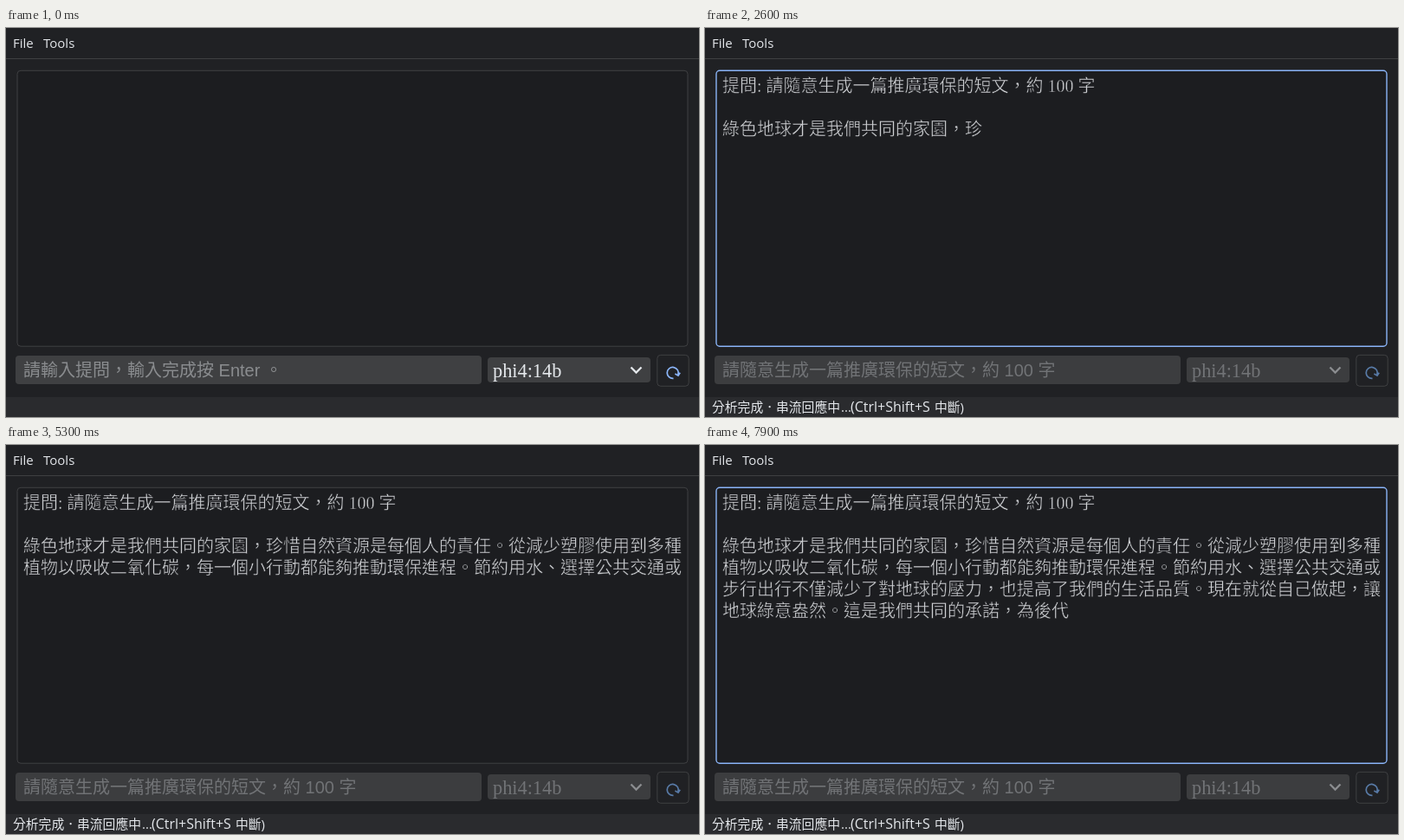
Recreate the animation shown at these times as an HTML page. Size 800 by 450 pixels, loop 8 s.

```html
<!DOCTYPE html>
<html lang="zh-Hant">
<head>
<meta charset="utf-8">
<style>
html, body { margin: 0; width: 100%; height: 100%; overflow: hidden; background: #202124; }
svg { display: block; width: 800px; height: 450px; }
text { white-space: pre; fill: #e4e7eb; }
.ui { font: 15px 'Open Sans', 'Noto Sans CJK TC', sans-serif; }
/* the background-coloured outline thins the strokes */
.doc { font: 300 20px 'Liberation Serif', 'Noto Sans CJK TC', serif; fill: #cfd1d4; stroke: #1c1d20; stroke-width: .4; }
.field { font: 300 20px 'Liberation Sans', 'Noto Sans CJK TC', sans-serif; fill: #d4d6d9; }
.line { fill: none; stroke: #3f4042; }
.box { fill: #3f4042; }
.focus { stroke: #8ab4f7; stroke-width: 1.4; }
#icon { fill: none; stroke: #8ab4f7; stroke-width: 1.7; }
#arrow { fill: none; stroke: #e4e7eb; stroke-width: 2.3; }
.busy .box { fill: #3c3d3f; }
.busy .field, .busy #model { fill: #717376; }
.busy #icon { stroke: #587aa6; }
.busy #arrow { stroke: #8b8d90; }
#entry.hint { fill: #8a8c8f; }
</style>
</head>
<body>
<svg id="app" viewBox="0 0 800 450">
  <rect width="800" height="450" fill="#202124"/>
  <path class="line" d="M0 35.5H800"/>
  <text class="ui" x="8" y="23">File</text>
  <text class="ui" x="43" y="23">Tools</text>

  <rect id="output" class="line" x="13" y="49.3" width="774" height="318.9" rx="4" style="fill:#1c1d20"/>
  <text id="question" class="doc" x="20" y="74"></text>
  <g id="answer"></g>

  <rect class="box" x="11" y="379" width="538" height="33" rx="4"/>
  <rect id="ring" class="line focus" x="11.7" y="379.5" width="536.6" height="32.3" rx="4"/>
  <text id="entry" class="field" x="20" y="403"></text>
  <path id="caret" d="M0 387V407" stroke="#e4e7eb"/>

  <rect class="box" x="556" y="381" width="188" height="29" rx="4"/>
  <text id="model" x="562" y="404" style="font:22.3px 'Liberation Serif',serif">phi4:14b</text>
  <path id="arrow" d="M721.5 392.5L727.5 398.5L733.5 392.5"/>

  <rect class="line" x="751.8" y="378.3" width="36.4" height="36" rx="4"/>
  <path id="icon" d="M770.5 405.4A6.5 6.5 0 1 1 775.9 401M772.4 400L776 402.2L778.2 398.8"/>

  <rect y="427" width="800" height="23" fill="#2a2b2e"/>
  <text id="status" class="ui" y="444"><tspan x="8" font-size="14.8">分析完成．串流回應中</tspan><tspan x="157">...</tspan><tspan x="168" font-size="16">(Ctrl+Shift+S</tspan><tspan x="265" font-size="14.8">中斷)</tspan></text>
</svg>
<script>
const $ = id => document.getElementById(id);
const PROMPT = '請隨意生成一篇推廣環保的短文，約 100 字';
const HINT = '請輸入提問，輸入完成按 Enter 。';
const ANSWER = [
  '綠色地球才是我們共同的家園，珍惜自然資源是每個人的責任。從減少塑膠使用到多種',
  '植物以吸收二氧化碳，每一個小行動都能夠推動環保進程。節約用水、選擇公共交通或',
  '步行出行不僅減少了對地球的壓力，也提高了我們的生活品質。現在就從自己做起，讓',
  '地球綠意盎然。這是我們共同的承諾，為後代'
];
// [time in ms, characters streamed so far]
const STREAM = [[1900, 0], [2500, 12], [2600, 15], [3400, 32], [3800, 41],
  [5300, 76], [6200, 99], [7000, 116], [7900, 134]];

const rows = ANSWER.map((_, i) => {
  const row = document.createElementNS('http://www.w3.org/2000/svg', 'text');
  row.setAttribute('class', 'doc');
  row.setAttribute('x', 20);
  row.setAttribute('y', 124 + i * 25);
  return $('answer').appendChild(row);
});

function streamed(t) {
  const i = STREAM.findIndex(([time]) => time >= t);
  if (i < 1) return 0;
  const [t0, n0] = STREAM[i - 1], [t1, n1] = STREAM[i];
  return Math.round(n0 + (n1 - n0) * (t - t0) / (t1 - t0));
}

const show = (id, on) => $(id).setAttribute('visibility', on ? 'visible' : 'hidden');

function draw(now) {
  const t = Math.floor(now % 8000 / 100) * 100;
  const typed = t >= 1000, busy = t >= 1700, editing = t >= 700 && !busy;

  $('app').classList.toggle('busy', busy);
  $('output').classList.toggle('focus', busy && (t < 4900 || t >= 5600));
  $('question').textContent = busy ? '提問: ' + PROMPT : '';
  $('entry').textContent = typed ? PROMPT : HINT;
  $('entry').classList.toggle('hint', !typed);
  $('caret').setAttribute('transform', `translate(${typed ? 405.5 : 20.5})`);
  show('ring', editing);
  show('caret', editing);
  show('status', busy);

  let left = streamed(t);
  rows.forEach((row, i) => {
    row.textContent = ANSWER[i].slice(0, Math.max(0, left));
    left -= ANSWER[i].length;
  });
  requestAnimationFrame(draw);
}
requestAnimationFrame(draw);
</script>
</body>
</html>
```
